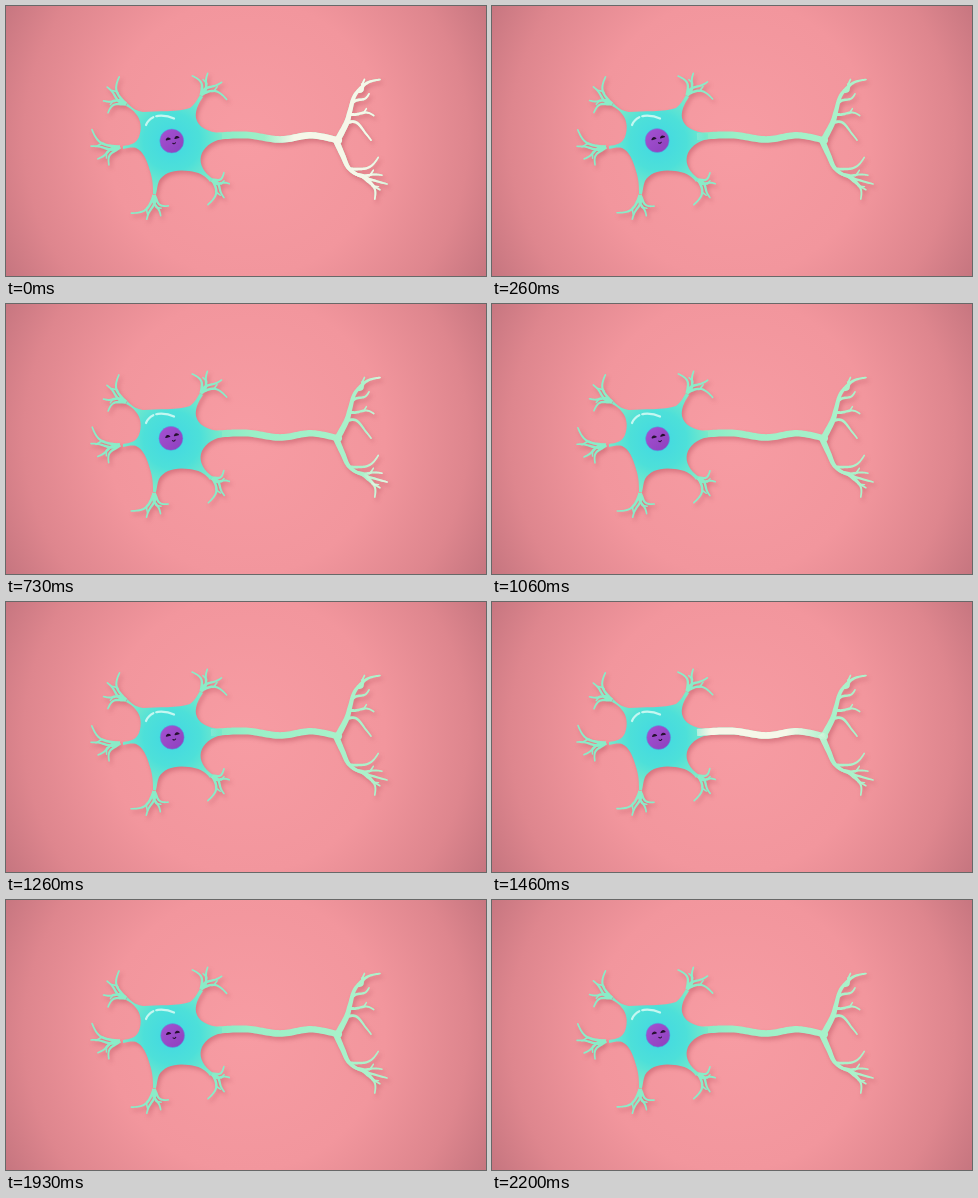
These frames come from a looping animation (480 by 270 pixels, 2.27 s). An HTML page:

```html
<!DOCTYPE html>
<html lang="en">
<head>
<meta charset="utf-8">
<title>Neuron</title>
<style>
html, body { margin: 0; width: 100%; height: 100%; overflow: hidden; background: #ee929a; }
svg { display: block; width: 100vw; height: 100vh; }
#cell { filter: drop-shadow(2.5px 3px 2px rgba(170, 60, 75, .38)); }
</style>
</head>
<body>
<svg viewBox="0 0 480 270" preserveAspectRatio="none">
  <defs>
    <radialGradient id="bg" gradientUnits="userSpaceOnUse" cx="240" cy="132" r="278">
      <stop offset="0" stop-color="#f79ca3"/>
      <stop offset=".5" stop-color="#f2969d"/>
      <stop offset=".8" stop-color="#de868e"/>
      <stop offset="1" stop-color="#c5757f"/>
    </radialGradient>
    <radialGradient id="soma" gradientUnits="userSpaceOnUse" cx="166" cy="136" r="52">
      <stop offset="0" stop-color="#41d8e3"/>
      <stop offset=".55" stop-color="#4de0d9"/>
      <stop offset="1" stop-color="#7ceac8"/>
    </radialGradient>
    <linearGradient id="axon" gradientUnits="userSpaceOnUse" x1="200" y1="0" x2="380" y2="0">
      <stop offset="0" stop-color="#7ceac8"/>
      <stop offset=".25" stop-color="#9aefc7"/>
      <stop offset="1" stop-color="#aef2cb"/>
    </linearGradient>
    <linearGradient id="pulse" gradientUnits="userSpaceOnUse" x1="0" y1="0" x2="150" y2="0">
      <stop offset="0" stop-color="#f6f7e9" stop-opacity="0"/>
      <stop offset=".2" stop-color="#f6f7e9"/>
      <stop offset=".7" stop-color="#f6f7e9"/>
      <stop offset="1" stop-color="#f6f7e9" stop-opacity="0"/>
    </linearGradient>
    <linearGradient id="core" x1="0" y1="0" x2="1" y2="1">
      <stop offset="0" stop-color="#a552d2"/>
      <stop offset="1" stop-color="#8d40bd"/>
    </linearGradient>
    <path id="eye" d="M-2 .8Q-.3 -2 2 .5Z" fill="#25102f" stroke-width="1.2"/>
  </defs>
  <rect width="480" height="270" fill="url(#bg)"/>
  <g id="cell">
    <g id="arms" fill="#8aecc8"></g>
    <g id="line" fill="url(#axon)"></g>
    <path fill="url(#soma)" d="M121 97C127 103 131 105 137 106C151 105 173 106 184 102C189 98 191 94 194 89L197 91
      C192 98 189 105 190 112C192 121 201 126 216 127.5L216 133C205 135 197 142 195 150C193 158 198 167 207 173
      L204 176C199 169 192 166 183 165C170 163 158 166 153 175C151 180 151 184 150 188L147 188
      C147 181 147 174 144 165C141 154 137 145 130 142C126 141 122 142 117 143L117 140
      C124 139 130 138 133 131C136 122 135 114 130 108C127 104 124 102 120 100Z"/>
    <g id="glow" fill="url(#pulse)"></g>
  </g>
  <path d="M140 119Q143 111.5 152 109.8Q161 109 168 112.5" fill="none" stroke="#c4f7f1"
    stroke-width="2.2" stroke-linecap="round" stroke-dasharray="11 3 40"/>
  <g id="nucleus">
    <circle r="12" fill="url(#core)" stroke="#4aa8e4" stroke-opacity=".5"/>
    <g id="face" fill="none" stroke="#25102f" stroke-linecap="round" stroke-linejoin="round">
      <g id="eyes"><use href="#eye" x="-4.4"/><use href="#eye" x="4.4"/></g>
      <path d="M-.6 4.2Q.8 5.8 2.2 4.2" stroke-width="1"/>
    </g>
  </g>
</svg>
<script>
const $ = id => document.getElementById(id);
const LOOP = 2270, FPS = 15, RAD = Math.PI / 180;
const PULSES = [-116, 460, 1460];
const mix = (a, b, f) => a + (b - a) * f;

// Fork, then first and last angle and reach of its fan of twigs
const DENDRITES = [
  { fork: [120, 98], angles: [154, 256], reach: [20, 28] },
  { fork: [195, 89], angles: [245, 369], reach: [21, 26] },
  { fork: [114, 141], angles: [122, 212], reach: [21, 33] },
  { fork: [148, 189], angles: [38, 142], reach: [18, 29] },
  { fork: [206, 174], angles: [-32, 99], reach: [14, 25] }
];
const AXON = [[205, 130.5], [240, 129], [274, 133.5], [305, 129.3], [333, 134.5]];
// Trunks whose twigs sprout along the stretch given by span
const TERMINALS = [
  { trunk: [[331, 135], [340.5, 117], [344, 105], [349, 89], [361, 77], [374, 73.5]],
    span: [.2, .65], angles: [35, -60], reach: [30, 14] },
  { trunk: [[329, 132], [336.5, 149], [343.5, 163], [357, 171], [381, 178]],
    span: [.5, .75], angles: [-22, 62], reach: [31, 25] }
];

// Smooth curve through points, as a function of 0..1
function spline(pts) {
  const n = pts.length - 1, at = i => pts[Math.max(0, Math.min(n, i))];
  return u => {
    const s = Math.min(n - 1, Math.floor(u * n)), f = u * n - s;
    return [0, 1].map(k => {
      const [a, b, c, d] = [-1, 0, 1, 2].map(j => at(s + j)[k]);
      return b + f * (c - a + f * (2 * a - 5 * b + 4 * c - d + f * (3 * b - a - 3 * c + d))) / 2;
    });
  };
}

// Bends from the heading toward its own angle, with a slight wave
function twig([x, y], angle, reach, heading, wave) {
  const c = Math.cos(angle), s = Math.sin(angle);
  const bx = (Math.cos(heading) - c) * reach * .5, by = (Math.sin(heading) - s) * reach * .5;
  return u => {
    const bend = 2 * u * (1 - u), w = wave * Math.sin(u * 2 * Math.PI);
    return [x + c * reach * u + bx * bend - s * w, y + s * reach * u + by * bend + c * w];
  };
}

// Outline of a curve whose width goes from w0 to w1
function taper(curve, w0, w1, steps = 28) {
  const left = [], right = [];
  for (let i = 0; i <= steps; i++) {
    const u = i / steps, [x, y] = curve(u);
    const [ax, ay] = curve(Math.max(0, u - .01)), [bx, by] = curve(Math.min(1, u + .01));
    const k = mix(w0, w1, u) / 2 / (Math.hypot(bx - ax, by - ay) || 1);
    left.push([x + (ay - by) * k, y + (bx - ax) * k]);
    right.unshift([x - (ay - by) * k, y - (bx - ax) * k]);
  }
  return `M${left.join("L")}A${w1 / 2} ${w1 / 2} 0 0 0 ${right.join("L")}Z`;
}

function fan(place, { angles, reach }, count = 4) {
  const heading = (angles[0] + angles[1]) / 2 * RAD, paths = [];
  for (let i = 0; i < count; i++) {
    const f = i / (count - 1), angle = mix(...angles, f) * RAD, len = mix(...reach, f);
    const side = i % 2 ? 1 : -1, curve = twig(place(f), angle, len, heading, 1.3 * side);
    paths.push(taper(curve, 3.2, 1.6));
    if (i % 2) paths.push(taper(twig(curve(.5), angle - .8, len * .28, angle, .3), 2.2, 1.4));
  }
  return paths;
}

function add(parent, tag, attrs = {}) {
  const el = document.createElementNS("http://www.w3.org/2000/svg", tag);
  for (const k in attrs) el.setAttribute(k, attrs[k]);
  return parent.appendChild(el);
}

const arms = DENDRITES.map(arm => {
  const g = add($("arms"), "g");
  fan(() => arm.fork, arm).forEach(d => add(g, "path", { d }));
  return g;
});

const nerve = [taper(spline(AXON), 7.2, 6.2, 60)];
for (const t of TERMINALS) {
  const trunk = spline(t.trunk);
  nerve.push(taper(trunk, 6.4, 1.7, 60), ...fan(f => trunk(mix(...t.span, f)), t));
}
for (const d of nerve) {
  add($("line"), "path", { d });
  add($("glow"), "path", { d });
}

function draw(t) {
  const drift = Math.cos((t - 1700) / LOOP * 2 * Math.PI);
  const blink = Math.exp(-(((t - 1730) / 50) ** 2));
  $("nucleus").setAttribute("transform", `translate(${165.8 + drift} ${135 + drift * .7})`);
  $("face").setAttribute("transform", `translate(${.8 - drift * .5} -2) rotate(${-10 + drift * 2})`);
  $("eyes").setAttribute("transform", `translate(0 -1) scale(1 ${1 - blink * .8})`);

  const start = PULSES.filter(p => p - 300 <= t).pop();
  $("pulse").setAttribute("gradientTransform", `translate(${185 + .63 * (t - start)} 0)`);

  arms.forEach((g, i) => {
    const sway = .7 * Math.sin(t / 1000 * Math.PI * 2 + i * 1.7);
    g.setAttribute("transform", `rotate(${sway} ${DENDRITES[i].fork})`);
  });
}

function tick(now) {
  const step = Math.min(33, Math.floor((now % LOOP + 6.7) * FPS / 1000));
  draw(step * 1000 / FPS);
  requestAnimationFrame(tick);
}
draw(0);
requestAnimationFrame(tick);
</script>
</body>
</html>
```
